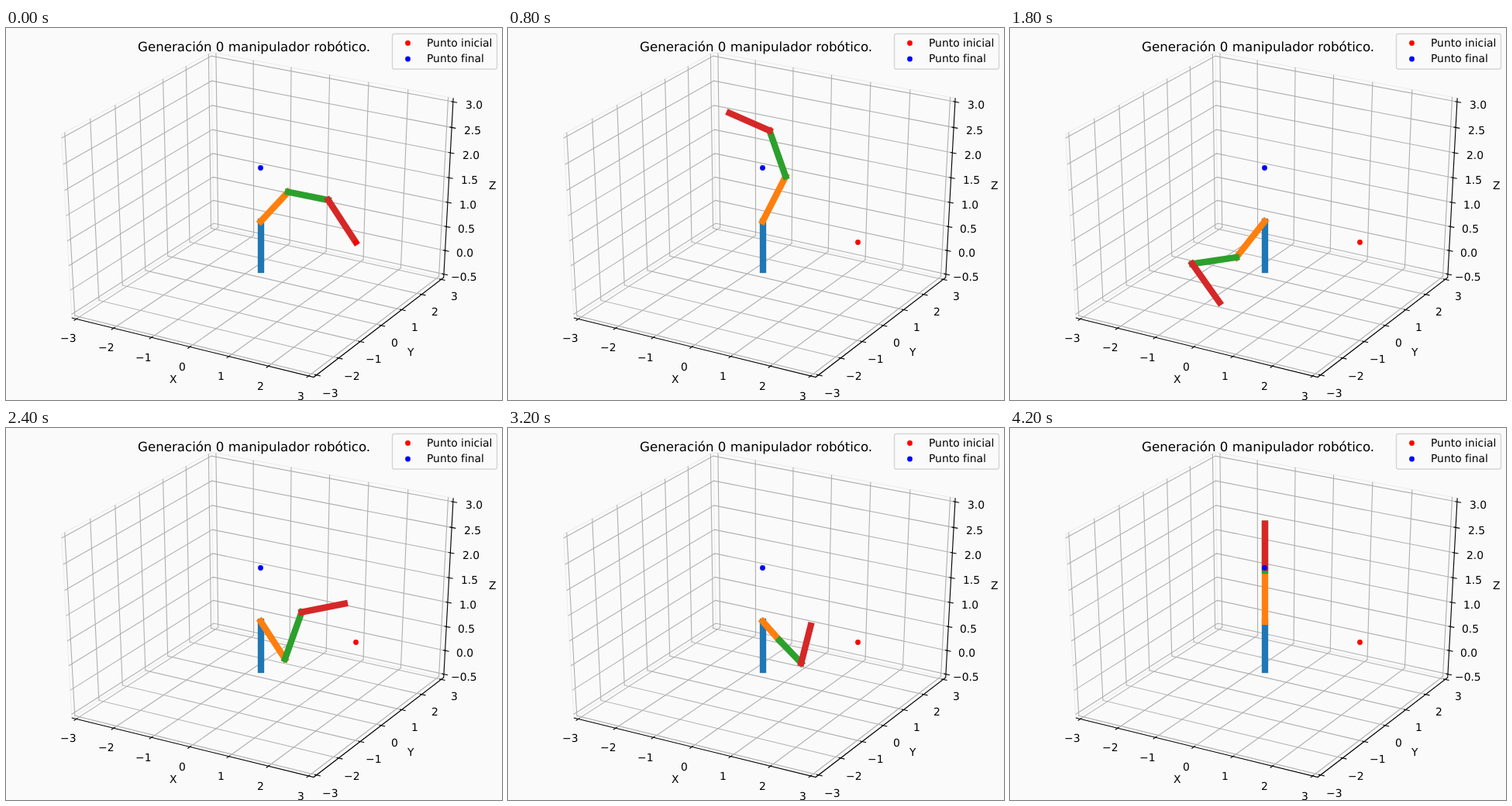
Recreate the animation shown at these times as an HTML page. Size 640x480 px, loop 4400 ms.

```html
<!DOCTYPE html>
<html lang="es">
<head>
<meta charset="utf-8">
<title>Manipulador</title>
<style>
html, body { margin: 0; width: 100%; height: 100%; overflow: hidden; background: #fafafa; }
svg { display: block; width: 640px; height: 480px; }
text {
  font-family: "DejaVu Sans", sans-serif; font-size: 13.89px; fill: #000;
  white-space: pre; text-rendering: geometricPrecision;
}
</style>
</head>
<body>
<svg id="stage" viewBox="0 0 640 480" xmlns="http://www.w3.org/2000/svg"></svg>
<script>
const svg = document.getElementById('stage');

function add(tag, attrs, text) {
  const el = document.createElementNS('http://www.w3.org/2000/svg', tag);
  for (const k in attrs) el.setAttribute(k, attrs[k]);
  if (text !== undefined) el.textContent = text;
  svg.appendChild(el);
  return el;
}

// Perspective view of a unit cube centred on the origin: azimuth -60, elevation 30.
const S = Math.sqrt(3) / 2;
function project([x, y, z]) {
  const right = S * x + 0.5 * y;
  const up = -0.25 * x + S / 2 * y + S * z;
  const dist = 10 - (S / 2 * x - 0.75 * y + 0.5 * z);
  return [
    (right / dist + 0.095) / 0.185 * 640,
    480 * (1 - (up / dist + 0.095) / 0.185)
  ];
}

const pointList = pts => pts.map(p => p.map(v => v.toFixed(2)).join(',')).join(' ');

function line3d(pts, stroke, width) {
  return add('polyline', {
    points: pointList(pts.map(project)), fill: 'none', stroke, 'stroke-width': width
  });
}

// Centred text that starts on a whole pixel.
function label(x, y, text, size = 13.89) {
  const el = add('text', { y: Math.round(y) }, text);
  el.style.fontSize = size + 'px';
  el.setAttribute('x', Math.round(x - el.getComputedTextLength() / 2));
}

const E = 0.5 + 1 / 48;      // cube edge
const L = E + 0.05705;       // tick label distance
const OUT = E + 1 / 60;      // tick ends
const IN = E - 1 / 120;

const range = (from, to, step) =>
  Array.from({ length: (to - from) / step + 1 }, (_, i) => from + i * step);
const flat = v => v / 6;
const tall = v => (v + 0.5) / 3.5 - 0.5;

function axis(values, scale, digits, grid, tick, at) {
  return values.map(v => {
    const u = scale(v);
    return { grid: grid(u), tick: tick(u), at: at(u), text: v.toFixed(digits).replace('-', '\u2212') };
  });
}

const ticks = [
  ...axis(range(-3, 3, 1), flat, 0,
    u => [[u, -E, -E], [u, E, -E], [u, E, E]],
    u => [[u, -OUT, -E], [u, -IN, -E]],
    u => [u, -L, -L]),
  ...axis(range(-3, 3, 1), flat, 0,
    u => [[E, u, -E], [-E, u, -E], [-E, u, E]],
    u => [[OUT, u, -E], [IN, u, -E]],
    u => [L, u, -L]),
  ...axis(range(-0.5, 3, 0.5), tall, 1,
    u => [[-E, -E, u], [-E, E, u], [E, E, u]],
    u => [[OUT, E, u], [IN, E, u]],
    u => [L, L, u])
];

function drawAxes() {
  const panes = [
    [[-E, -E, -E], [-E, E, -E], [-E, E, E], [-E, -E, E], [-E, -E, -E]],
    [[-E, E, -E], [E, E, -E], [E, E, E], [-E, E, E]],
    [[-E, -E, -E], [E, -E, -E], [E, E, -E]]
  ];
  panes.forEach(p => line3d(p, '#ededed', 1.1));
  ticks.forEach(t => line3d(t.grid, '#b0b0b0', 1.11));
  line3d([[-E, -E, -E], [E, -E, -E], [E, E, -E], [E, E, E]], '#000', 1.11);
  for (const t of ticks) {
    line3d(t.tick, '#000', 1.11);
    const [x, y] = project(t.at);
    label(x, y + 10.8, t.text);
  }
  label(215.5, 458, 'X');
  label(521.8, 423, 'Y');
  label(627.5, 208, 'Z');
}

const dot = ([cx, cy], fill) => add('circle', { cx, cy, r: 3.4, fill });

function drawLegend() {
  label(320, 30, 'Generación 0 manipulador robótico.', 16.667);
  add('rect', {
    x: 498.5, y: 7.5, width: 135, height: 45.5, rx: 2.8,
    fill: '#fafafa', 'fill-opacity': 0.8, stroke: '#ccc', 'stroke-opacity': 0.8, 'stroke-width': 1.39
  });
  [['#f00', 'Punto inicial', 19.5], ['#00f', 'Punto final', 40]].forEach(([color, text, y]) => {
    dot([518.5, y], color);
    add('text', { x: 543, y: Math.floor(y + 4.7) }, text);
  });
}

const base = project([0, 0, tall(0)]);
const shoulder = project([0, 0, tall(1)]);
const [CX, CY] = shoulder.map(Math.round);

// A pose given only by its tip bends the arm in an even arch, clockwise of the chord.
function arch(x, y) {
  const dx = x - shoulder[0], dy = y - shoulder[1];
  const along = (t, side) => [
    shoulder[0] + t * dx - side * dy,
    shoulder[1] + t * dy + side * dx
  ];
  return [along(0.315, 0.194), along(0.685, 0.194), [x, y]];
}

const START = [451.2, 276.2];
const GOAL = [CX, 180.2];
const STEP = 200;
const poses = [
  [[363.9, 211.6], [415.8, 222], START],
  arch(332, 102), arch(263, 79), arch(275, 110),
  [[358.2, 191.5], [337.5, 132.5], [285.7, 109.7]],
  arch(294, 349), arch(239, 187),
  [[352, 199.5], [383, 148.5], [431.3, 121]],
  arch(332, 330),
  [[292, 296], [235.2, 304.2], [270.3, 354]],
  arch(346, 346), arch(335, 212),
  [[360, 298], [381.5, 237.5], [436.9, 226.6]],
  arch(376, 285), arch(362, 167), arch(340, 83),
  [[350.3, 274], [378.3, 303.2], [390.6, 255]],
  arch(303, 312), arch(300, 155), arch(268, 298), arch(302, 184),
  [[CX, 184], [CX, 123.6], GOAL]
];

drawAxes();

const links = ['#1f77b4', '#ff7f0e', '#2ca02c', '#d62728'].map(stroke =>
  add('polyline', { fill: 'none', stroke, 'stroke-width': 8.33, 'stroke-linecap': 'square' }));
links[0].setAttribute('points', pointList([base.map(Math.round), [CX, CY]]));

dot([451.5, 276.5], '#f00');
dot([328.5, 180.5], '#00f');
drawLegend();

function render(ms) {
  const pose = poses[Math.floor(ms / STEP) % poses.length];
  const root = pose[0][0] === CX ? [CX, CY] : shoulder;
  const joints = [root, ...pose];
  pose.forEach((p, i) => links[i + 1].setAttribute('points', pointList([joints[i], p])));
}

const start = performance.now();
function tick() {
  render(performance.now() - start);
  requestAnimationFrame(tick);
}
tick();
</script>
</body>
</html>
```
